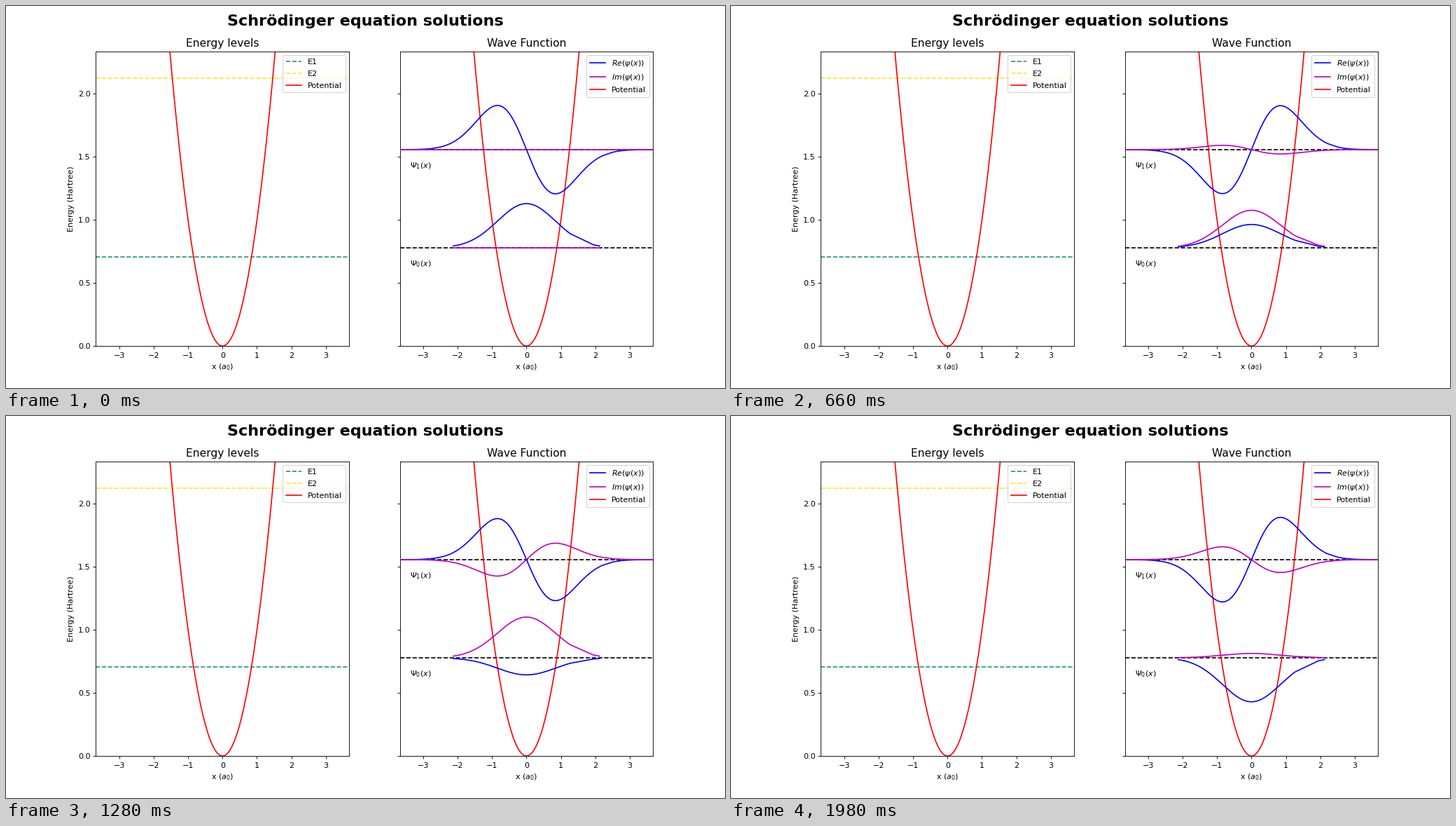
These frames come from a looping animation (1027x545 px, 2 s). A matplotlib script:

```python
import numpy as np
import matplotlib.pyplot as plt
from matplotlib.animation import FuncAnimation

DPI = 80
FRAMES, INTERVAL = 100, 20
STEP = 0.03074            # ground-state phase advance per frame
ENERGIES = np.sqrt(0.5) * np.array([1, 3])
TOP = 1.1 * ENERGIES[-1]
AMP = 0.15 * TOP
REACH = 3 * np.sqrt([0.5, 1.5])


def sample(reach, gap):
    """Dense grid over [-reach, reach] with no points inside the gap."""
    lo, hi = gap
    return np.r_[np.linspace(-reach, lo, 300), np.linspace(hi, reach, 60)]


def ground(x):
    return AMP * np.exp(-x**2 / np.sqrt(2))


def excited(x):
    peak = 2**-0.25 * np.exp(-0.5)
    return -AMP * x * np.exp(-x**2 / np.sqrt(2)) / peak


def style(ax, title, spacing):
    ax.set_title(title, fontsize=14)
    ax.set_xlabel("x ($a_0$)")
    ax.tick_params(axis="x", pad=4.4)
    ax.set_xlim(-REACH[1], REACH[1])
    ax.set_ylim(0, TOP)
    ax.legend(loc="upper right", labelspacing=spacing, borderpad=0.43)


def potential(ax):
    x = np.linspace(-REACH[1], REACH[1], 600)
    ax.plot(x, x**2, "r", label="Potential")


fig, (left, right) = plt.subplots(
    1, 2, sharey=True, figsize=(1027 / DPI, 545 / DPI), dpi=DPI)
fig.subplots_adjust(top=0.881)
fig.suptitle("Schrödinger equation solutions", y=0.978,
             fontsize=20, fontweight="bold")

for n, (energy, shade) in enumerate(zip(ENERGIES, (0.5, 1.0)), 1):
    left.axhline(energy, ls="--", color=plt.cm.viridis(shade), label=f"E{n}")
potential(left)
left.set_ylabel("Energy (Hartree)")
style(left, "Energy levels", 0.6)

grids = [sample(REACH[0], (1.27, 1.93)), sample(REACH[1], (2.204, 2.485))]
waves = []
for n, (x, psi) in enumerate(zip(grids, (ground, excited))):
    base = TOP * (n + 1) / 3
    right.axhline(base, ls="--", color="k")
    right.text(-0.92 * REACH[1], base - TOP / 16,
               rf"$\mathrm{{\Psi}}_{n}(x)$")
    re_line, = right.plot(x, base + psi(x), "b", zorder=3)
    im_line, = right.plot(x, base + 0 * x, "m", zorder=3)
    if n == 0:
        re_line.set_label(r"$Re(\psi(x))$")
        im_line.set_label(r"$Im(\psi(x))$")
    waves.append((re_line, im_line, base, psi(x), 2 * n + 1))
potential(right)
style(right, "Wave Function", 0.54)


def update(frame):
    changed = []
    for re_line, im_line, base, shape, rate in waves:
        phase = rate * STEP * frame
        re_line.set_ydata(base + shape * np.cos(phase))
        im_line.set_ydata(base + shape * np.sin(phase))
        changed += [re_line, im_line]
    return changed


anim = FuncAnimation(fig, update, frames=FRAMES, interval=INTERVAL,
                     init_func=lambda: update(0), repeat=True)
plt.show()
```
